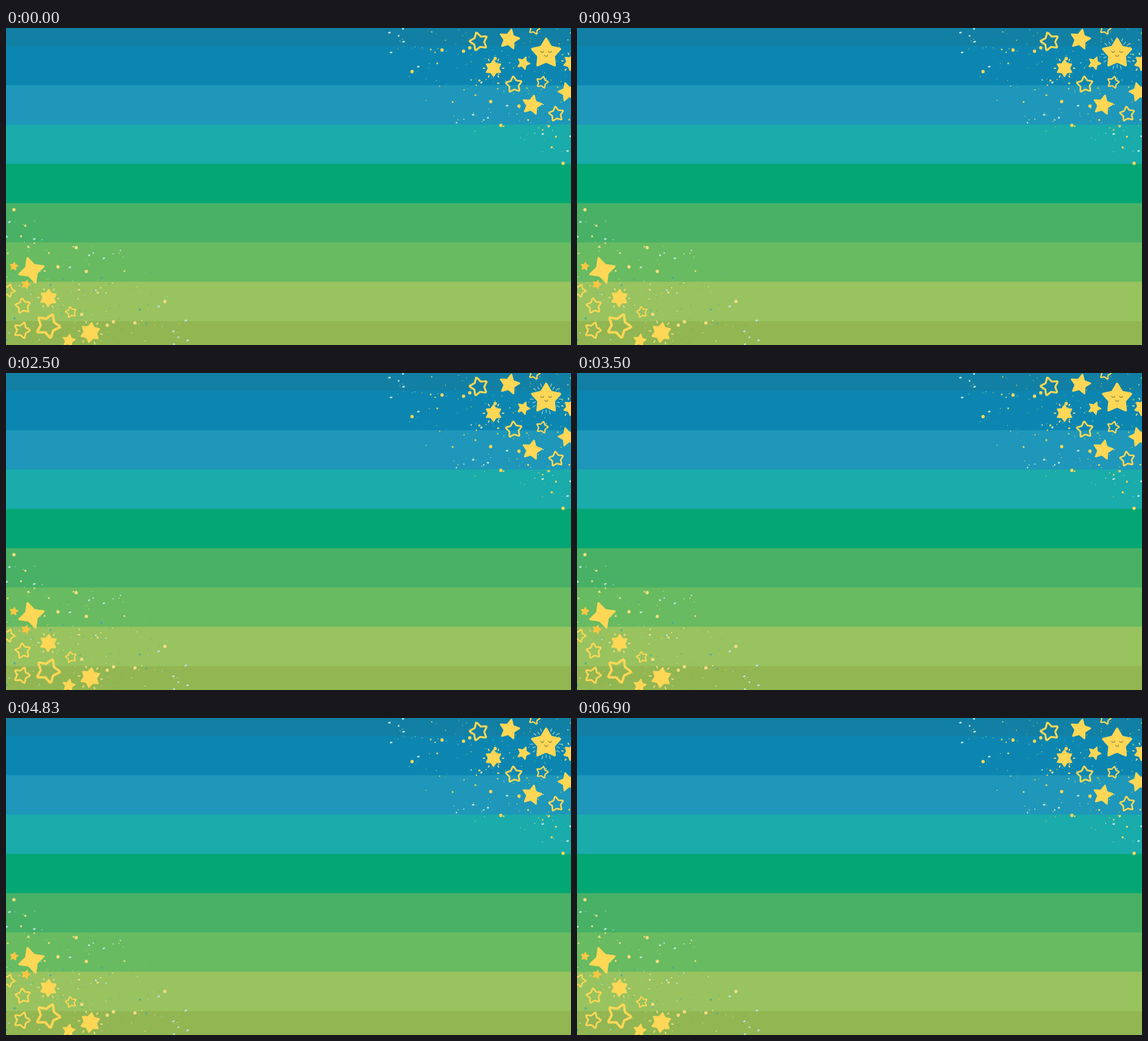
An HTML page with a canvas for the animation above (6.93 s loop, 999 px wide and 560 px high).

```html
<!DOCTYPE html>
<html lang="en">
<head>
<meta charset="utf-8">
<title>Starry stripes</title>
<style>
html, body { margin: 0; width: 100%; height: 100%; overflow: hidden; background: #05a774; }
canvas { display: block; width: 999px; height: 560px; }
</style>
</head>
<body>
<canvas id="stage" width="999" height="560"></canvas>
<script>
const W = 999, H = 560, LOOP = 6930, BLINK = LOOP / 4;
const GOLD = '#fdd755', AMBER = '#fbc743', PALE = '#f3dc80', MIST = '#bde3dc', TEAL = '#45ada0', LIME = '#5dbb80';

const ctx = document.getElementById('stage').getContext('2d');
const still = document.createElement('canvas');
still.width = W;
still.height = H;
const g = still.getContext('2d');
g.lineCap = ctx.lineCap = 'round';

function polar(x, y, r, deg) {
  const a = deg * Math.PI / 180;
  return [x + r * Math.sin(a), y - r * Math.cos(a)];
}

// Star with softened corners
function starPath(x, y, r, turn, tips, inner) {
  const corner = i => polar(x, y, i % 2 ? r * inner : r, turn + i * 180 / tips);
  const [ax, ay] = corner(0), [bx, by] = corner(1);
  g.beginPath();
  g.moveTo((ax + bx) / 2, (ay + by) / 2);
  for (let i = 1; i <= tips * 2; i++) g.arcTo(...corner(i), ...corner(i + 1), r * 0.07);
  g.closePath();
}

function solid(x, y, r, turn, tips = 5, inner = 0.5, color = GOLD) {
  starPath(x, y, r, turn, tips, inner);
  g.fillStyle = color;
  g.fill();
}

function outline(x, y, r, turn) {
  g.strokeStyle = GOLD;
  g.lineWidth = 0.4 + r * 0.155;
  starPath(x, y, r - g.lineWidth / 2, turn, 5, 0.55);
  g.stroke();
}

// Six-tipped star with short strokes between its tips
function shiny(x, y, r, turn) {
  solid(x, y, r, turn, 6, 0.62);
  g.strokeStyle = PALE;
  g.lineWidth = 2;
  for (let i = 0; i < 6; i++) {
    const a = turn + 30 + i * 60;
    g.beginPath();
    g.moveTo(...polar(x, y, r * 0.95, a));
    g.lineTo(...polar(x, y, r * 1.1, a));
    g.stroke();
  }
}

function dot(x, y, r, color) {
  g.fillStyle = color;
  g.beginPath();
  g.arc(x, y, r, 0, 7);
  g.fill();
}

function random(seed) {
  return () => (seed = seed * 16807 % 2147483647) / 2147483647;
}

function stripes() {
  const tones = ['#1280a4', '#0c86b1', '#1e97ba', '#1aabab', '#04a774', '#48b166', '#68bb60', '#98c35f', '#92b652'];
  tones.forEach((tone, i) => {
    const top = i ? 31.6 + (i - 1) * 69.45 : 0;
    g.fillStyle = tone;
    g.fillRect(0, top, W, H - top);
  });
}

// Both corners carry the same spray; distances are measured from the corner
const BOLD = [[228, 39], [281, 77], [190, 41], [179, 35], [142, 130], [124, 172], [92, 138], [134, 54], [14, 239]];
const FLECKS = [[321, 8], [318, 43], [296, 24], [270, 68], [173, 153], [50, 187], [113, 137], [6, 217]];

function spray(x, y, flipX, flipY, bold, tints) {
  const rnd = random(4711);
  g.save();
  g.translate(x, y);
  g.scale(flipX, flipY);
  for (let i = 0; i < 190; i++) {
    const d = Math.pow(rnd(), 0.6), a = rnd() * Math.PI / 2;
    const size = 0.7 + 1.3 * Math.pow(rnd(), 4);
    dot(310 * d * Math.cos(a), 232 * d * Math.sin(a), size, tints[i % tints.length]);
  }
  for (const [px, py] of BOLD) dot(px, py, 2.9, bold);
  for (const [px, py] of FLECKS) {
    dot(px - 0.8, py, 1.5, MIST);
    dot(px + 0.9, py + 0.5, 1.4, MIST);
  }
  g.restore();
}

function face(x, y) {
  g.strokeStyle = '#8d8a49';
  g.lineWidth = 1.3;
  for (const [dx, dy] of [[-7, -5], [7, -5], [0, 2]]) {
    g.beginPath();
    g.arc(x + dx, y + dy, 3, 0.35, Math.PI - 0.35);
    g.stroke();
  }
}

function topCorner() {
  spray(W, 0, -1, 1, GOLD, [GOLD, LIME, '#c5cf62', LIME, GOLD, MIST]);
  solid(890, 20, 21, 12);
  solid(915, 62, 13.5, 22);
  solid(993, 113, 19.5, -15);
  solid(930, 136, 20.5, 12);
  shiny(862, 71, 16.5, 0);
  shiny(1000, 61, 16, 10);
  outline(836, 24, 19, -15);
  outline(898, 100, 17, -5);
  outline(948, 96, 12.5, 14);
  outline(973, 152, 15.5, -8);
  outline(934, 1, 12, 14);
  solid(955, 45, 30, 0, 5, 0.55);
  face(955, 45);
}

function bottomCorner() {
  spray(0, H, 1, -1, PALE, [PALE, TEAL, TEAL, TEAL, PALE, MIST]);
  solid(45, 428, 27, -18, 4, 0.46);
  solid(14, 421, 9, 8, 5, 0.5, AMBER);
  solid(35, 453, 9.5, 18, 5, 0.5, AMBER);
  solid(111, 552, 13.5, 10);
  shiny(75, 477, 17, 3);
  shiny(149, 538, 19.5, 8);
  outline(4, 464, 13.5, 20);
  outline(30, 491, 16, -8);
  outline(28, 534, 17, 18);
  outline(74, 526, 25, 23);
  outline(115, 502, 11.5, -12);
}

// Bursts of three strokes in the five notches of the smiling star
function rays(k) {
  ctx.globalAlpha = k;
  ctx.strokeStyle = '#9bd3cf';
  ctx.lineWidth = 1.3;
  for (let i = 0; i < 5; i++) {
    for (let j = -1; j <= 1; j++) {
      const a = 36 + i * 72 + j * 15, from = j ? 23 : 20;
      ctx.beginPath();
      ctx.moveTo(...polar(955, 45, from, a));
      ctx.lineTo(...polar(955, 45, from + 5 * k, a));
      ctx.stroke();
    }
  }
  ctx.globalAlpha = 1;
}

const ramp = (a, b, v) => Math.min(1, Math.max(0, (v - a) / (b - a)));

function draw(now) {
  const p = now % BLINK / BLINK;
  const k = ramp(0.2, 0.3, p) * (1 - ramp(0.84, 0.94, p));
  ctx.drawImage(still, 0, 0);
  if (k > 0) rays(k);
}

stripes();
topCorner();
bottomCorner();
const start = performance.now();
function tick() {
  draw(performance.now() - start);
  requestAnimationFrame(tick);
}
tick();
</script>
</body>
</html>
```
